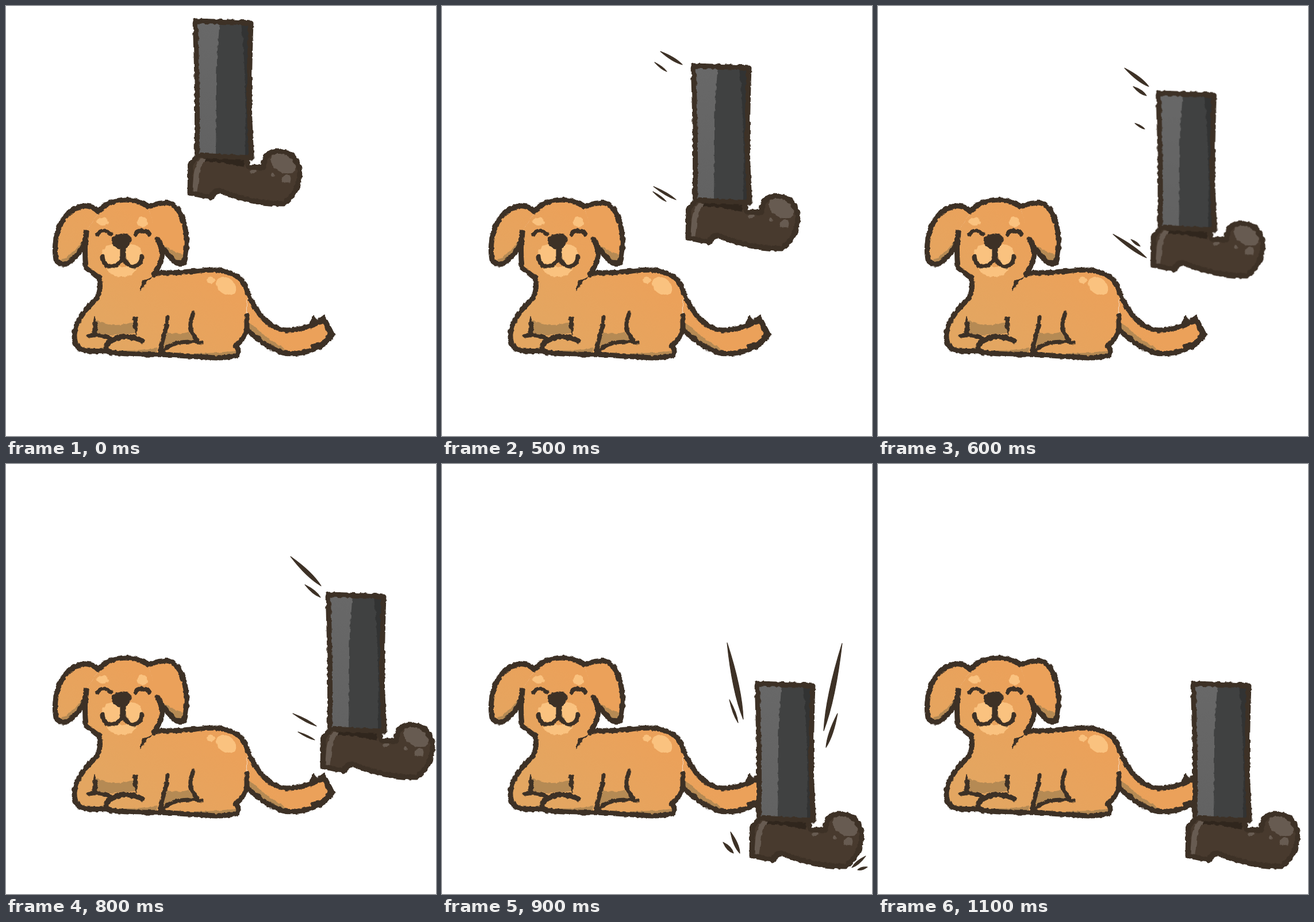
An HTML page that plays this animation: 748x748 px, repeating every 1.7 s.

```html
<!DOCTYPE html>
<html lang="en">
<head>
<meta charset="utf-8">
<title>Dog and boot</title>
<style>
  html, body { margin: 0; width: 100%; height: 100%; overflow: hidden; background: #fff; }
  svg { display: block; width: 100vw; height: 100vh; }
  .ink { fill: none; stroke: #3d3126; stroke-width: 9; stroke-linecap: round; stroke-linejoin: round; }
  .thin { stroke-width: 7; }
  .solid, #marks path { fill: #3d3126; stroke: #3d3126; stroke-width: 1.2; stroke-linejoin: round; }
  .fur { fill: url(#fur); }
  .shade { fill: #b58a54; }
  .light { fill: #fac27f; }
  .leather { fill: #483a2e; }
  .shine { fill: #675b51; }

  #leg { animation: stomp 1700ms step-end infinite; }
  @keyframes stomp {
    0% { transform: translate(0, 0); }
    23.5294% { transform: translate(57px, 36px); }
    29.4118% { transform: translate(108px, 78px); }
    35.2941% { transform: translate(158.5px, 125.5px); }
    41.1765% { transform: translate(198px, 164px); }
    47.0588% { transform: translate(231px, 201px); }
    52.9412%, 100% { transform: translate(219px, 356px); }
  }
  #marks g { visibility: hidden; animation: flash 1700ms step-end infinite; }
  @keyframes flash {
    0% { visibility: visible; }
    5.88235%, 100% { visibility: hidden; }
  }
</style>
</head>
<body>
<svg viewBox="0 0 748 748">
  <defs>
    <linearGradient id="fur" gradientUnits="userSpaceOnUse" x1="170" y1="600" x2="310" y2="430">
      <stop offset="0.1" stop-color="#e3a661"/>
      <stop offset="1" stop-color="#eba15a"/>
    </linearGradient>
    <linearGradient id="cloth" x1="0" y1="0" x2="0" y2="1">
      <stop offset="0" stop-color="#686868"/>
      <stop offset="1" stop-color="#626262"/>
    </linearGradient>
    <filter id="rough" filterUnits="userSpaceOnUse" x="0" y="0" width="748" height="748" color-interpolation-filters="sRGB">
      <feTurbulence type="fractalNoise" baseFrequency="0.13" numOctaves="2" seed="4"/>
      <feDisplacementMap in="SourceGraphic" scale="5" xChannelSelector="R" yChannelSelector="G"/>
    </filter>
    <path id="tail" d="M419 562Q446 590 480 603Q503 608 531 599L552 589L566 572L552 544L541 552Q516 564 488 564C460 562 438 541 420 498"/>
    <path id="earL" d="M161 357C140 339 116 350 101 369C86 391 83 421 87 441Q94 452 107 448C128 433 140 414 140 393"/>
    <path id="earR" d="M247 349C276 339 291 338 302 359C316 384 317 419 310 446Q299 452 288 439Q272 424 264 406"/>
    <path id="boot" d="M331 264L321 274L320 325L357 333Q361 321 373 322C410 334 432 344 483 344Q511 323 511 288Q506 252 470 252Q447 256 448 281L421 280L418 266"/>
  </defs>

  <g id="dog" filter="url(#rough)">
    <use href="#tail" class="fur"/>
    <path class="shade" d="M421 549Q448 574 476 590L490 602L474 600Q445 586 418 560Z"/>
    <use href="#tail" class="ink"/>
    <path class="solid" d="M528 553L535 538L541 547L554 537L572 572L564 583L553 588L549 597L530 599L531 589L549 585L561 571L553 553Z"/>

    <!-- body -->
    <path class="fur" d="M164 474Q167 496 156 511C137 528 122 547 119 571Q118 597 139 600L372 611L402 607L400 589Q418 576 418 552L420 498Q413 463 364 459L262 464L200 440Z"/>
    <path class="shade" d="M156 546Q190 564 225 546L224 569L183 573L156 568Z"/>
    <path class="shade" d="M279 568Q300 572 318 567L327 581Q294 582 272 594ZM272 601Q330 608 400 600L400 608L272 606ZM132 594Q155 602 172 593L174 600ZM180 598Q220 602 263 594L262 605Z"/>
    <path class="ink" d="M162 474Q167 496 156 511C137 528 122 547 119 571Q118 597 139 600L176 601M262 464C320 466 330 458 364 459Q413 463 420 499"/>
    <path class="ink" d="M419 538L419 560Q416 579 400 590L405 600L401 608Q386 612 365 612L268 606Q225 607 183 603Q171 599 175 592C181 576 215 569 237 583"/>
    <path class="ink thin" d="M144 574Q164 570 181 578M281 541C281 560 272 579 268 602M326 534C316 555 321 569 334 583M272 601C285 585 313 581 340 586"/>
    <path class="solid" d="M154 541L159 556L158 573L151 573Q150 557 154 541ZM221 542L228 541L229 556L227 572L222 558ZM266 463Q247 471 234 495Q235 468 258 459Z"/>
    <ellipse class="light" cx="383" cy="487" rx="19" ry="14" transform="rotate(38 383 487)"/>
    <ellipse class="light" cx="357" cy="477" rx="7" ry="6"/>

    <!-- head -->
    <path class="fur" d="M161 357Q175 339 207 337Q232 338 247 349L265 405L272 435L262 463Q235 490 163 477L139 456L139 394Z"/>
    <use href="#earL" class="fur"/>
    <use href="#earR" class="fur"/>
    <path class="shade" d="M136 403Q125 425 94 444L106 449Q129 431 136 415ZM266 407Q283 426 309 432L307 448Q298 451 288 439Z"/>
    <use href="#earL" class="ink"/>
    <use href="#earR" class="ink"/>
    <path class="ink" d="M161 357Q175 339 207 337Q232 338 247 349M139 394Q136 425 139 455L163 474M270 418Q274 433 268 448L258 467"/>

    <!-- face -->
    <ellipse class="light" cx="168" cy="375" rx="10" ry="7"/>
    <ellipse class="light" cx="237" cy="376" rx="9.5" ry="9"/>
    <circle class="light" cx="184" cy="432" r="17"/>
    <circle class="light" cx="220" cy="432" r="17"/>
    <path class="light" d="M175 457Q203 450 227 457Q219 471 203 471Q184 472 175 457Z"/>
    <path class="ink thin" d="M159 398Q162 391 171 391Q179 391 182 397M225 397Q229 390 238 391Q247 391 249 397M168 436Q169 453 183 453Q196 453 203 437Q211 453 223 453Q235 451 236 436"/>
    <path class="solid" d="M184 408Q187 397 199 398Q212 395 217 403Q219 412 208 421L208 437L199 437L199 422Q185 419 184 408Z"/>
  </g>

  <g id="leg">
    <g filter="url(#rough)">
      <use href="#boot" class="leather"/>
      <path d="M345 262L418 267L413 280Q378 271 345 270Z" fill="#30261d"/>
      <path class="shine" d="M338 266L349 266Q335 280 335 304L332 325L324 323L326 300Q327 277 338 266Z"/>
      <ellipse class="shine" cx="482" cy="274" rx="23" ry="15" transform="rotate(30 482 274)"/>
      <ellipse class="shine" cx="488" cy="301" rx="8.5" ry="7"/>
      <circle class="shine" cx="464" cy="294" r="3"/>
      <ellipse class="shine" cx="430" cy="288" rx="7" ry="3"/>
      <use href="#boot" class="ink"/>
      <!-- trouser -->
      <path d="M329 26L426 30L427 264L331 260Z" fill="#404141"/>
      <path d="M329 26L372 28Q365 100 366 150L365 260L331 260Z" fill="url(#cloth)"/>
      <path d="M409 29L426 30L425 264L416 262Q419 120 409 29Z" fill="#323333"/>
      <path class="ink" d="M329 26L426 29Q422 150 424 200L427 264L332 260Q334 150 329 26Z"/>
    </g>
  </g>

  <g id="marks"></g>
</svg>
<script>
  // Motion marks: x1, y1, x2, y2, width
  const start = [[329, 37, 367, 60, 5], [319, 56, 340, 72, 3], [317, 272, 356, 295, 4], [316, 281, 339, 298, 3]];
  const swing = [[429, 108, 471, 140, 6], [444, 140, 467, 156, 5], [447, 204, 464, 214, 3],
                 [409, 397, 467, 438, 6], [440, 406, 456, 418, 4]];
  const reach = [[495, 161, 548, 212, 7], [520, 210, 547, 232, 5], [499, 434, 540, 456, 4], [508, 466, 537, 480, 3]];
  const fall = [[496, 311, 524, 444, 9], [500, 410, 515, 450, 4], [696, 312, 664, 464, 9], [688, 434, 668, 493, 6]];
  const dust = [[502, 640, 518, 677, 6], [489, 658, 507, 677, 6], [737, 682, 713, 702, 5], [740, 701, 723, 706, 4]];

  const move = (marks, dx, dy) => marks.map(([a, b, c, d, w]) => [a + dx, b + dy, c + dx, d + dy, w]);
  const shrink = ([a, b, c, d, w]) => [a, b, a + (c - a) * 0.6, b + (d - b) * 0.6, w * 0.55];
  const fade = [
    ...fall, ...move(dust.slice(0, 2), -20, 12), ...move(dust.slice(2), 1, 36)
  ].map(shrink);

  // One set per 100 ms, beginning at 400 ms
  const steps = [start, move(start, 51, 42), swing, move(reach, -33, -37), reach, [...fall, ...dust], fade];

  const ns = 'http://www.w3.org/2000/svg';
  const add = (parent, tag) => parent.appendChild(document.createElementNS(ns, tag));

  // A leaf-shaped stroke, thickest past its middle
  function leaf(x1, y1, x2, y2, w) {
    const dx = x2 - x1, dy = y2 - y1, len = Math.hypot(dx, dy);
    const cx = x1 + dx * 0.62, cy = y1 + dy * 0.62;
    const nx = -dy / len * w, ny = dx / len * w;
    return `M${x1} ${y1}Q${cx + nx} ${cy + ny} ${x2} ${y2}Q${cx - nx} ${cy - ny} ${x1} ${y1}Z`;
  }

  steps.forEach((marks, i) => {
    const g = add(document.getElementById('marks'), 'g');
    g.style.animationDelay = `${400 + i * 100}ms`;
    marks.forEach(m => add(g, 'path').setAttribute('d', leaf(...m)));
  });
</script>
</body>
</html>
```
